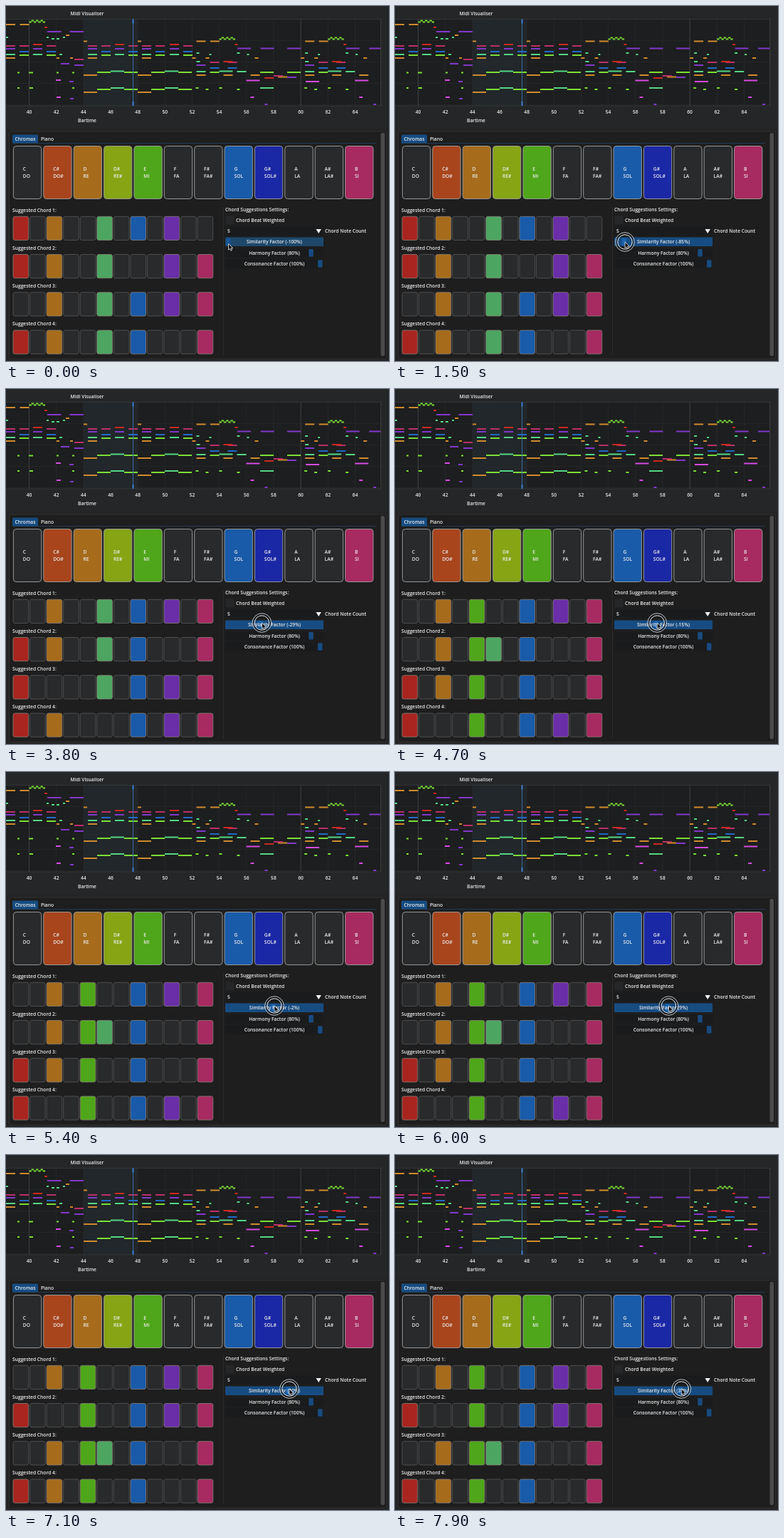
Write an HTML page that moves like this. It is 538 by 498 pixels and loops after 8000 ms.

```html
<!DOCTYPE html>
<html lang="en">
<head>
<meta charset="utf-8">
<title>Chord suggestions</title>
<style>
html, body { margin: 0; width: 100%; height: 100%; overflow: hidden; background: #242425; }
svg { display: block; width: 538px; height: 498px; }
text { font: 600 6.7px "Open Sans", "Noto Sans", sans-serif; fill: #ececec; }
.mid { text-anchor: middle; }
</style>
</head>
<body>
<svg id="stage" viewBox="0 0 538 498"></svg>
<script>
const stage = document.getElementById('stage');

function add(tag, attrs, parent = stage) {
  const el = document.createElementNS('http://www.w3.org/2000/svg', tag);
  for (const k in attrs) el.setAttribute(k, attrs[k]);
  parent.appendChild(el);
  return el;
}
function box(x, y, width, height, fill, more = {}) {
  return add('rect', { x, y, width, height, fill, ...more });
}
function label(str, x, midY, more = {}) {
  const el = add('text', { x, y: midY + 2.4, ...more });
  el.textContent = str;
  return el;
}
const centred = { class: 'mid' };

// ---------- piano roll ----------
const BAR = 19.08;
const barX = bar => 32.5 + (bar - 40) * BAR;
const ink = {
  orange: '#cf8a2c', lime: '#7bdf35', teal: '#55d684', purple: '#8138ca', red: '#cb291f',
  pink: '#bd2e69', blue: '#2169c9', violet: '#d44be0'
};

function notes(color, y, w, ...xs) {
  for (const x of xs) if (x < 526) box(x, y - 1, Math.min(w, 526 - x), 2, ink[color]);
}

function drawRoll() {
  box(0, 0, 538, 172, '#252627');
  box(0, 18.5, 526.5, 121.5, '#1d1e1f');
  box(109, 18.5, 76, 121.5, '#21272a');
  for (let y = 48; y < 140; y += 30) box(0, y, 526, 0.6, '#292a2b');
  for (let b = 40; b <= 64; b += 2) {
    const strong = b % 20 === 0;
    box(barX(b) - 0.4, 18.5, 0.8, 121.5, strong ? '#4a4b4c' : '#292a2b');
    label(b, barX(b), 149, centred);
  }
  box(0, 18, 527, 0.8, '#393a3b');
  box(0, 139.6, 527, 0.8, '#393a3b');
  box(526, 18, 0.8, 122, '#454545');

  const trill = (x, y) => {
    for (let i = 0; i < 7; i++) notes('lime', y + (i % 2 ? -1 : 1), 3.4, x + i * 3.2);
  };
  const lowChord = (...xs) => { notes('pink', 56, 13, ...xs); notes('purple', 60, 13, ...xs); notes('teal', 68, 13, ...xs); };
  const midChord = (...xs) => { notes('pink', 56, 13, ...xs); notes('blue', 64, 13, ...xs); notes('lime', 69, 13, ...xs); };
  const topChord = (...xs) => { notes('red', 54, 13, ...xs); notes('purple', 60, 13, ...xs); notes('teal', 68, 13, ...xs); };

  lowChord(0, 115, 191);
  midChord(19, 57, 134, 172, 210, 249);
  topChord(38, 153, 230);

  // opening phrase
  notes('orange', 26, 13, 0, 19.5);
  trill(32.5, 21.5);
  notes('red', 30, 4, 54);
  notes('purple', 36, 19.5, 58, 89.5);
  notes('teal', 44, 3, 0, 57, 80);
  notes('teal', 46, 4, 64, 71);
  notes('orange', 41, 5, 84);
  notes('orange', 73, 13, 0, 115, 191);
  notes('orange', 73, 4, 71, 90);
  notes('teal', 68, 4, 75);
  notes('purple', 81, 12, 77);
  notes('pink', 75, 13, 96);
  notes('purple', 83, 13, 96);
  notes('lime', 93.5, 3, 16, 71, 93);
  notes('lime', 93.5, 6, 32);
  notes('lime', 115, 3, 16, 93);
  notes('lime', 115, 5, 33);
  notes('violet', 104, 7, 70);
  notes('purple', 106, 6, 89);
  notes('violet', 128, 6, 71);
  notes('purple', 130, 5, 90);

  // bass of the looped bars
  notes('orange', 49.5, 5, 109, 185);
  notes('orange', 97, 19, 109, 185);
  notes('orange', 121, 19, 109, 185);
  notes('lime', 93, 19, 128, 166, 204, 242);
  notes('teal', 91.5, 19, 147, 223);
  notes('lime', 117, 19, 128, 166, 204, 242);
  notes('teal', 115, 19, 147, 223);

  // eight-bar phrase, heard twice
  for (const s of [barX(52), barX(60)]) {
    notes('orange', 49.5, 13, s + 6, s + 25.5);
    trill(s + 38, 45.5);
    notes('red', 54, 4, s + 60);
    notes('purple', 59.5, 19, s + 63.5, s + 96);
    notes('teal', 66, 4, s + 6, s + 63);
    notes('teal', 68, 3, s + 24, s + 77);
    notes('orange', 73, 5, s, s + 19, s + 88);
    notes('purple', 83, 13, s + 6);
    notes('teal', 78, 5, s + 6);
    notes('pink', 79, 13, s + 25, s + 50);
    notes('red', 78, 13, s + 44);
    notes('blue', 87, 13, s + 25, s + 50);
    notes('teal', 91.5, 19, s + 38);
    notes('teal', 92, 13, s + 6, s + 63);
    notes('lime', 93, 13, s + 25);
    notes('orange', 97, 13, s + 6, s + 44, s + 82);
    notes('violet', 104.5, 19, s + 76);
    notes('lime', 115, 4, s + 5, s + 38);
    notes('lime', 117, 4, s + 19, s + 63);
    notes('violet', 128, 5, s + 82);
    notes('purple', 138, 4, s + 102);
  }
  notes('purple', 59.5, 19, 395);
  notes('red', 101, 13, 363);
  notes('orange', 99.5, 13, 382);
  notes('lime', 93, 19, 357, 395);
  notes('pink', 98, 13, 376);
  notes('purple', 100, 13, 395);
  notes('violet', 106, 19, 421);
  notes('teal', 115, 19, 357);

  box(178, 18.5, 1, 121.5, '#3a6ba3');
  for (const y of [18.5, 134]) box(177.6, y, 1.8, 6, '#3f86df');
  label('Midi Visualiser', 114, 11, centred);
  label('Bartime', 114, 161, centred);
}

// ---------- lower panel ----------
const names = 'C C# D D# E F F# G G# A A# B'.split(' ');
const solfa = 'DO DO# RE RE# MI FA FA# SOL SOL# LA LA# SI'.split(' ');
const tint = {
  C: '#a9251f', 'C#': '#a8451d', D: '#a66c1c', 'D#': '#86a414', E: '#4fa61a', F: '#4ca661',
  G: '#195ba9', 'G#': '#1b28a6', A: '#692ea8', B: '#a72a60'
};
const lit = ['C#', 'D', 'D#', 'E', 'G', 'G#', 'B'];
const blank = '#282a2c';
const well = '#1a1b1c';
const cells = [];

function drawPanel() {
  box(0, 171.5, 538, 327, '#242425');
  box(4.5, 176, 530, 319, '#1e1e1e', { rx: 2, stroke: '#343434', 'stroke-width': 0.8 });
  box(526.5, 178, 5.5, 313, '#4b4b4b', { rx: 2 });
  box(9, 180.5, 36, 12, '#174c82', { rx: 1.5 });
  box(9, 192, 511, 0.8, '#214261');
  label('Chromas', 27, 186.5, centred);
  label('Piano', 58, 186.5, centred);

  names.forEach((name, i) => {
    const x = 10.4 + i * 42.38, on = lit.includes(name);
    box(x, 196.5, 39.3, 74, on ? tint[name] : blank, { rx: 4, stroke: '#a3a3a3', 'stroke-width': 0.9 });
    const look = { fill: on ? '#e2ddd8' : '#b4b4b4' };
    label(name, x + 13.4, 228.5, look);
    label(solfa[i], x + 13.4, 239, look);
  });

  for (let r = 0; r < 4; r++) {
    const y = 295.3 + r * 53.2;
    label(`Suggested Chord ${r + 1}:`, 9, 286.3 + r * 53.2);
    cells.push(names.map((_, i) =>
      box(10 + i * 23.56, y, 21.6, 33.2, blank, { rx: 2.5, 'stroke-width': 0.8 })));
  }

  box(305, 282, 0.8, 208, '#303030');
  label('Chord Suggestions Settings:', 308, 285.3);
  box(308.5, 294.5, 12, 12, '#262728', { rx: 1 });
  label('Chord Beat Weighted', 323, 300.5);
  box(308, 309.5, 138, 12.5, well, { rx: 1 });
  label('5', 311, 316);
  add('path', { d: 'M435.5 313h7.4l-3.7 6z', fill: '#f0f0f0' });
  label('Chord Note Count', 448, 316);
}

function slider(y, pos) {
  const bar = box(308, y, 138, 12.5, well, { rx: 1 });
  const grip = box(pos, y + 1, 6.5, 10.5, '#184b80', { rx: 0.8 });
  return { bar, grip, text: label('', 377, y + 6.4, centred) };
}

drawRoll();
drawPanel();
const similarity = slider(324.5, 309);
slider(340, 425.3).text.textContent = 'Harmony Factor (80%)';
slider(355.3, 438).text.textContent = 'Consonance Factor (100%)';

const pointer = add('g', {});
const halo = add('g', { fill: 'none', stroke: '#ededed' }, pointer);
add('circle', { r: 11.8, stroke: '#101820', 'stroke-width': 2.6, opacity: 0.6 }, halo);
add('circle', { r: 13.3, 'stroke-width': 0.8 }, halo);
add('circle', { r: 10.2, 'stroke-width': 1 }, halo);
add('path', {
  d: 'M0 0v8.6l2-1.8 1.4 3 1.6-.8-1.4-2.8h2.7z',
  fill: '#0b0b0b', stroke: '#f2f2f2', 'stroke-width': 0.8
}, pointer);

// ---------- motion ----------
const LOOP = 8000, PRESS = 900;
const drag = [[0, -100], [1000, -100], [1500, -85], [3000, -47], [3800, -29], [3900, -27],
  [4100, -27], [5400, -2], [6500, 19], [7400, 36], [7600, 36], [7900, 37]];
const height = [[0, 333.5], [1000, 333.5], [1500, 331], [2800, 328]];
const chords = [
  [0, 'CDFGA CDFAB DFGAB CDFGB'],
  [3400, 'DFGAB CDFGB CDFGA CDFAB'],
  [3700, 'DFGAB CDFGB CFGAB CDGAB'],
  [4700, 'DEGAB DEFGB CDEGB CEGAB'],
  [6100, 'DEGAB CEGAB DEFGB CDEGB']
];

function track(keys, t) {
  const i = keys.findIndex(k => k[0] > t);
  if (i < 0) return keys[keys.length - 1][1];
  const [t0, a] = keys[i - 1], [t1, b] = keys[i];
  return a + (b - a) * (t - t0) / (t1 - t0);
}

function render(t) {
  const held = t >= PRESS;
  const value = track(drag, t);
  const x = held ? 323 + (value + 85) * 0.65 : 312.5;
  const pos = 309 + (value + 100) * 0.645;
  similarity.bar.setAttribute('fill', held ? '#174c82' : '#1d486b');
  similarity.grip.setAttribute('x', pos);
  similarity.grip.setAttribute('fill', held ? '#1b63ad' : '#175493');
  similarity.text.textContent = `Similarity Factor (${Math.round(value)}%)`;
  halo.setAttribute('visibility', held ? 'visible' : 'hidden');
  pointer.setAttribute('transform', `translate(${x} ${track(height, t)})`);

  const rows = chords.filter(c => c[0] <= t).pop()[1].split(' ');
  cells.forEach((row, r) => row.forEach((cell, i) => {
    const on = rows[r].includes(names[i]);
    cell.setAttribute('fill', on ? tint[names[i]] : blank);
    cell.setAttribute('stroke', on ? '#8a807a' : '#58595a');
  }));
}

const start = performance.now();
function tick() {
  const t = (performance.now() - start) % LOOP;
  render(Math.floor(t / 100) * 100);
  requestAnimationFrame(tick);
}
render(0);
requestAnimationFrame(tick);
</script>
</body>
</html>
```
